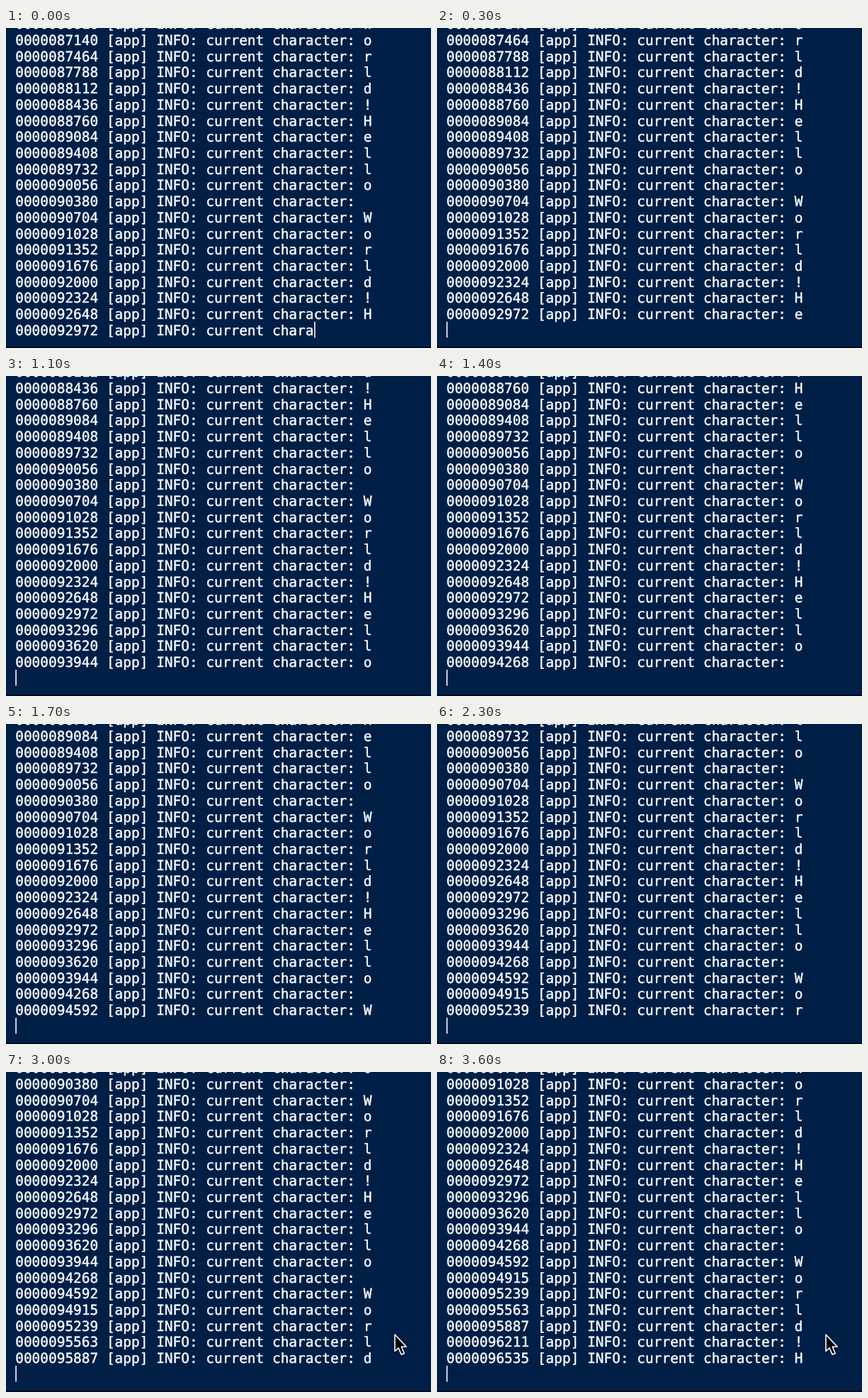
These frames come from a looping animation (600 by 451 pixels, 3900 ms). An HTML page:

```html
<!DOCTYPE html>
<html lang="en">
<head>
<meta charset="utf-8">
<title>Serial log</title>
<style>
  html, body { margin: 0; width: 100%; height: 100%; overflow: hidden; background: #001f47; }
  svg { display: block; width: 600px; height: 451px; }
  text {
    font: 19.46px "DejaVu Sans Mono", monospace;
    fill: #f8fafc;
    stroke: #f8fafc; stroke-width: 0.45; stroke-linejoin: round;
    white-space: pre;
    text-rendering: geometricPrecision;
  }
  #pointer {
    fill: #000; stroke: #fff; stroke-width: 1.6; stroke-linejoin: round;
    animation: show 3900ms step-end infinite;
  }
  @keyframes show {
    0% { visibility: hidden; }
    64.1% { visibility: visible; }
    100% { visibility: visible; }
  }
</style>
</head>
<body>
<svg viewBox="0 0 600 451">
  <rect width="600" height="451" fill="#001f47"/>
  <rect y="449" width="600" height="2" fill="#000a1e"/>
  <g id="log"></g>
  <rect id="caret" y="414" width="1.6" height="22.5" fill="#f8fafc"/>
  <path id="pointer" d="M549 370V393.5L554 388.8L558.2 398.2L562.2 396.5L558.2 387.3H565.2Z"/>
</svg>
<script>
  const LOOP = 3900, ROWS = 19, PITCH = 22.72, ADVANCE = 11.715;
  const MESSAGE = "Hello World!";
  // Moments at which a line is finished and the log moves up
  const breaks = [100, 400, 700, 1000, 1300, 1700, 1900, 2300, 2600, 3000, 3200, 3500];
  // Half-received lines: [from, to, characters]
  const partials = [[0, 100, 36], [1600, 1700, 30], [2900, 3000, 33]];

  const log = document.getElementById("log");
  const caret = document.getElementById("caret");

  const rows = Array.from({ length: ROWS + 1 }, (_, i) => {
    const row = document.createElementNS("http://www.w3.org/2000/svg", "text");
    row.setAttribute("x", 13.2);
    row.setAttribute("y", 23.9 + (i - 1) * PITCH);
    return log.appendChild(row);
  });

  function logLine(k) {
    const stamp = String(Math.floor(87140.95 + 323.96 * k)).padStart(10, "0");
    return `${stamp} [app] INFO: current character: ${MESSAGE[(k + 19) % 12]}`;
  }

  let last = "";
  function draw(now) {
    const t = now % LOOP;
    const shift = breaks.filter(b => b <= t).length;
    const part = partials.find(([from, to]) => t >= from && t < to);
    const typed = part ? part[2] : 0;
    const state = shift + ":" + typed;
    if (state !== last) {
      last = state;
      rows.forEach((row, i) => {
        const line = logLine(shift + i - 1);
        row.textContent = i < ROWS ? line : line.slice(0, typed);
      });
      caret.setAttribute("x", 13.3 + typed * ADVANCE);
    }
  }

  const start = performance.now();
  function tick() {
    draw(performance.now() - start);
    requestAnimationFrame(tick);
  }
  tick();
</script>
</body>
</html>
```
